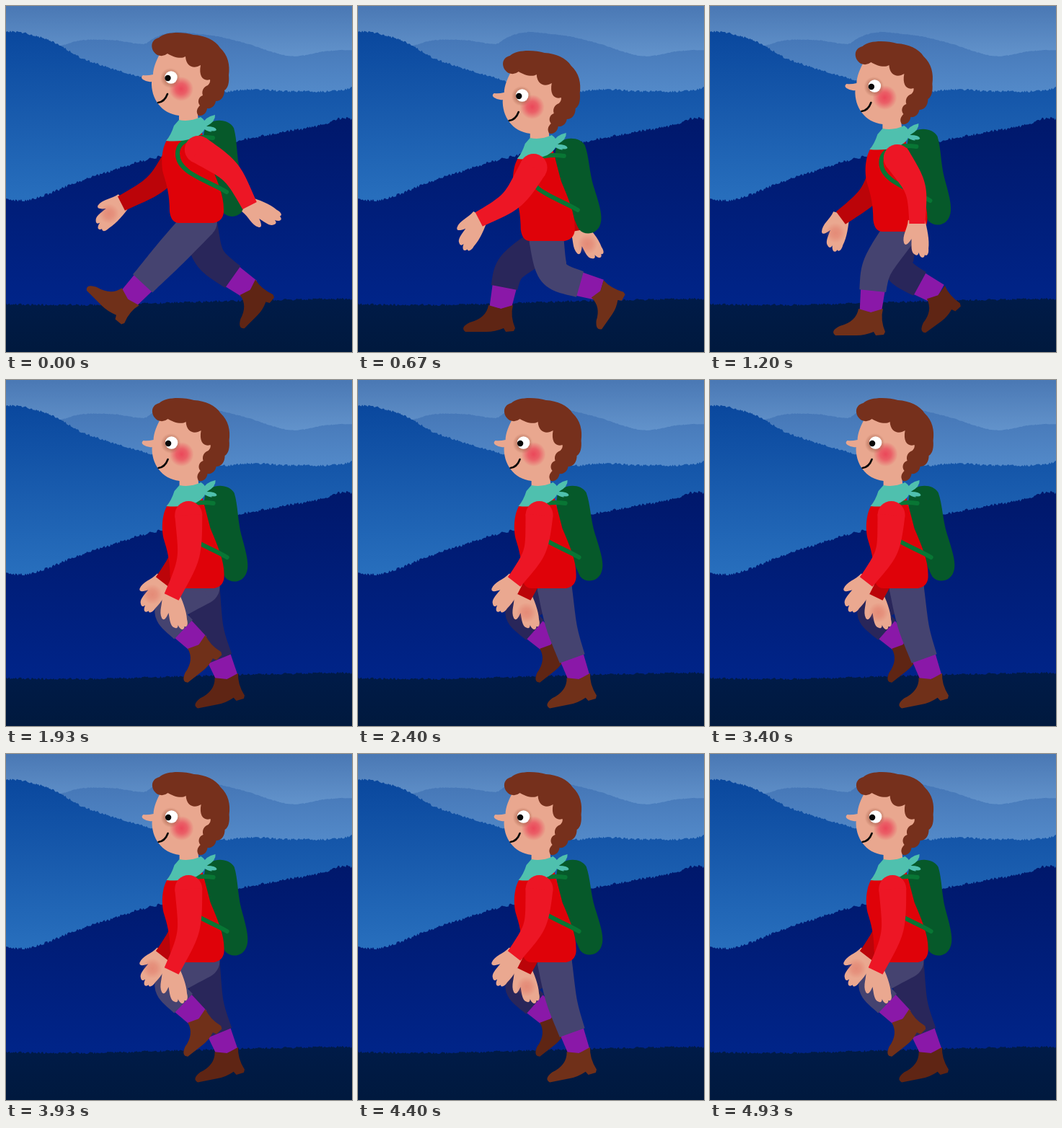
Write an HTML page with a canvas that moves like this. It is 480 px wide and 480 px high and loops after 4.99 s.

```html
<!DOCTYPE html>
<html lang="en">
<head>
<meta charset="utf-8">
<title>Mountain walk</title>
<style>
html, body { margin: 0; height: 100%; overflow: hidden; background: #001a42; }
canvas { display: block; width: 480px; height: 480px; }
</style>
</head>
<body>
<canvas id="stage" width="480" height="480"></canvas>
<script>
const LOOP = 4990, POSES = 10, RAD = Math.PI / 180;
const stage = document.getElementById('stage').getContext('2d');
let g = stage;

// Periodic Hermite spline through rows [key, ...values].
function spline(rows, t, period) {
  const n = rows.length;
  const row = i => {
    const turns = Math.floor(i / n), r = rows[i - turns * n];
    return [r[0] + turns * period, ...r.slice(1)];
  };
  t %= period;
  let i = n - 1;
  while (rows[i][0] > t) i--;
  const [a, b, c, d] = [i - 1, i, i + 1, i + 2].map(row);
  const h = c[0] - b[0], s = (t - b[0]) / h;
  return b.slice(1).map((p, k) => {
    k++;
    const q = c[k];
    const m = (q - a[k]) / (c[0] - a[0]) * h;
    const w = (d[k] - p) / (d[0] - b[0]) * h;
    return p + s * (m + s * (3 * (q - p) - 2 * m - w + s * (2 * (p - q) + m + w)));
  });
}

// Paths through one stride: pose, x, y, turn. Left and right run half a stride apart.
const ANKLE = [
  [0, 172, 404, 45], [1, 198, 416, 0], [2, 223, 421, 0], [4, 306, 411, -11],
  [5, 336, 391, -45], [6, 333, 393, -55], [7, 314, 398, -36], [9, 265, 364, -38]
];
const WRIST = [
  [0, 338, 277, -63], [1, 309, 286, -34], [2, 288, 290, -6], [4, 216, 292, 33],
  [5, 160, 274, 45], [6, 169, 271, 29], [7, 182, 282, 14], [9, 229, 313, -16]
];
const DROP = [0, 25, 12, -4, -12]; // body height through one step

const SHAPES = {
  boot: 'M-17-1L0 4 17-1Q13 14 20 31L18 35 7 36 4 31Q-8 36-20 36L-49 36Q-57 30-43 23Q-20 17-17-1Z',
  sock: 'M-17-30H17L15 4H-15Z',
  hand: 'M-12-6C-14 6-23 14-21 25C-19 30-14 25-10 20C-11 30-13 38-8 42C-5 45-3 43-2 40C-1 48 4 50 6 44C9 47 12 43 12 36C15 24 13 8 11-6Z',
  pack: 'M276 172C280 156 308 154 316 168C322 185 322 205 328 225C336 250 342 268 337 279C332 292 316 294 308 285C300 270 290 240 282 215C276 195 273 185 276 172Z',
  strap: 'M287 183C264 180 238 184 238 205C238 232 280 242 306 258',
  torso: 'M228 180C217 190 214 213 218 232C223 248 227 262 227 285Q229 301 240 301H288Q303 298 302 282C302 262 293 242 283 218Q277 195 272 176Z',
  scarf: 'M240 158Q255 161 270 154Q279 160 277 168Q272 180 258 184Q241 189 222 187Q229 179 233 166Z',
  tails: 'M271 166Q275 154 290 151Q291 160 278 167Q291 167 292 172Q288 176 277 170L286 174Q282 176 272 169Z',
  face: 'M217 60Q204 82 204 95Q196 97 190 96Q186 99 190 102Q196 106 202 105C201 128 215 149 240 152V162H267L266 150 285 130 290 85 250 55Z',
  hair: 'M210 68C200 62 199 47 212 44C222 35 246 36 260 40C276 41 290 47 297 58C308 68 311 82 309 96C310 106 308 114 303 117C303 126 298 132 291 132C290 139 284 143 279 142C278 149 273 153 267 152C263 147 265 142 269 138C265 133 267 126 273 124C271 118 274 112 280 110Q284 106 283 102C274 105 267 98 270 82C262 87 250 86 249 70C243 74 232 71 224 66Q218 71 210 68Z',
  mouth: 'M211 134Q220 133 224 122'
};
for (const k in SHAPES) SHAPES[k] = new Path2D(SHAPES[k]);

function fill(name, color) { g.fillStyle = color; g.fill(SHAPES[name]); }
function line(name, color, width) {
  g.strokeStyle = color; g.lineWidth = width; g.lineCap = 'round';
  g.stroke(SHAPES[name]);
}
function disc(x, y, r, color) {
  g.fillStyle = color;
  g.beginPath(); g.arc(x, y, r, 0, 7); g.fill();
}
function glow(x, y, r, rgb, alpha) {
  const c = g.createRadialGradient(x, y, 0, x, y, r);
  c.addColorStop(0, `rgba(${rgb},${alpha})`);
  c.addColorStop(.45, `rgba(${rgb},${alpha * .75})`);
  c.addColorStop(1, `rgba(${rgb},0)`);
  disc(x, y, r, c);
}
function at(x, y, angle, draw) {
  g.save(); g.translate(x, y); g.rotate(angle * RAD); draw(); g.restore();
}

// Point beside the line a-b: a share of the way along, then sideways.
function joint(ax, ay, bx, by, along, side) {
  const d = Math.hypot(bx - ax, by - ay), c = (bx - ax) / d, s = (by - ay) / d;
  return [ax + c * d * along - s * side, ay + s * d * along + c * side];
}

// Tapered tube bent at (kx, ky): round start, flat end.
function limb(ax, ay, kx, ky, bx, by, wa, wb, color) {
  const left = [], right = [];
  for (let i = 0; i <= 24; i++) {
    const t = i / 24, s = 1 - t, m = 3 * t * s;
    const x = ax * s ** 3 + kx * m + bx * t ** 3, y = ay * s ** 3 + ky * m + by * t ** 3;
    const dx = s * s * (kx - ax) + t * t * (bx - kx), dy = s * s * (ky - ay) + t * t * (by - ky);
    const w = (wa + (wb - wa) * t) / (Math.hypot(dx, dy) || 1);
    left.push([x - dy * w, y + dx * w]);
    right.unshift([x + dy * w, y - dx * w]);
  }
  disc(ax, ay, wa, color);
  g.beginPath();
  for (const p of left.concat(right)) g.lineTo(...p);
  g.fill();
}

function leg(pose, hipX, hipY, pants, boot) {
  const [x, y, turn] = spline(ANKLE, pose, POSES);
  // The closer the foot is to the hip, the further the knee comes out.
  const bend = Math.max(0, 135 - Math.hypot(x - hipX, y - hipY)) * .9;
  const [kx, ky] = joint(hipX, hipY, x, y, .47 - (x - hipX) / 1000, bend);
  const shin = Math.atan2(y - ky, x - kx);
  at(x, y, shin / RAD - 90, () => fill('sock', '#8a18a8'));
  at(x, y, turn, () => {
    g.scale(1 + Math.min(0, turn) / 400, 1); // a raised heel shortens the boot
    fill('boot', boot);
  });
  limb(hipX, hipY, kx, ky, x - 26 * Math.cos(shin), y - 26 * Math.sin(shin), 24, 18.5, pants);
}

function arm(pose, color, palm) {
  const [x, y, turn] = spline(WRIST, pose, POSES);
  const shoulder = [256 + (x - 255) * .13, 199];
  at(x, y, turn, () => {
    fill('hand', '#eaa890');
    if (palm) glow(-2, 22, 14, '222,110,95', .5);
  });
  limb(...shoulder, ...joint(...shoulder, x, y, .5, -15), x, y, 19, 11, color);
}

function head() {
  fill('face', '#e9a78f');
  glow(243, 115, 17, '235,55,80', .85);
  glow(228, 100, 14, '135,65,45', .65);
  disc(229, 99, 8.7, '#fff');
  disc(224.5, 100, 4.2, '#080808');
  line('mouth', '#080808', 2.6);
  fill('hair', '#76301c');
}

function walker(pose) {
  const other = pose + POSES / 2, drop = DROP[pose % 5];
  const hip = 269 - drop * .3;
  const tilt = 4 * Math.max(0, Math.cos((pose - .5) * 36 * RAD));
  leg(other, hip, 302 + drop, '#29265a', '#5f2514');
  leg(pose, hip, 299 + drop, '#454370', '#703019');
  g.save();
  g.translate(-drop * .05, drop);
  arm(other, '#bb0409', true);
  at(295, 170, tilt, () => { g.translate(-295, -170); fill('pack', '#06592a'); });
  head();
  fill('torso', '#df0209');
  line('strap', '#087634', 6);
  fill('scarf', '#4fc0ae');
  fill('tails', '#4fc0ae');
  arm(pose, '#ed1625', false);
  g.restore();
}

// Ridge line with a seeded fringe of trees, filled with a vertical gradient.
function ridge(points, fringe, y0, y1, top, bottom) {
  const c = g.createLinearGradient(0, y0, 0, y1);
  c.addColorStop(0, top); c.addColorStop(1, bottom);
  g.fillStyle = c;
  g.beginPath();
  g.moveTo(0, 480);
  for (let x = 0; x <= 480; x += 1.5) {
    const noise = Math.abs(Math.sin(x * 12.9898 + y0) * 43758.5453) % 1;
    g.lineTo(x, spline(points, x, 700)[0] - noise * fringe);
  }
  g.lineTo(480, 480);
  g.fill();
}

function landscape() {
  ridge([[0, -9], [480, -9]], 0, 0, 75, '#4a78b4', '#6495cd');
  ridge([[0, 75], [75, 56], [105, 48], [150, 48], [192, 53], [207, 44], [232, 37], [265, 39],
    [300, 44], [335, 53], [395, 70], [446, 63], [480, 62]], 1, 40, 125, '#4576b6', '#548bca');
  ridge([[0, 38], [40, 43], [75, 56], [105, 74], [180, 98], [230, 112], [300, 120],
    [340, 117], [400, 120], [480, 115]], 3, 38, 270, '#0a489e', '#286fbd');
  ridge([[0, 270], [120, 239], [200, 214], [320, 189], [430, 169], [480, 159]],
    4, 160, 410, '#00186c', '#002488');
  ridge([[0, 415], [130, 416], [300, 411], [480, 408]], 3, 405, 480, '#001b48', '#00193e');
}

const backdrop = document.createElement('canvas');
backdrop.width = backdrop.height = 480;
g = backdrop.getContext('2d');
landscape();
g = stage;

const start = performance.now();
function draw() {
  const t = (performance.now() - start) % LOOP;
  // Ten held poses a second, seen at fifteen pictures a second.
  const step = Math.floor((Math.floor(t / 10) * 10 + 5) * .015);
  g.drawImage(backdrop, 0, 0);
  walker(Math.floor(step * 2 / 3) % POSES);
  requestAnimationFrame(draw);
}
draw();
</script>
</body>
</html>
```
